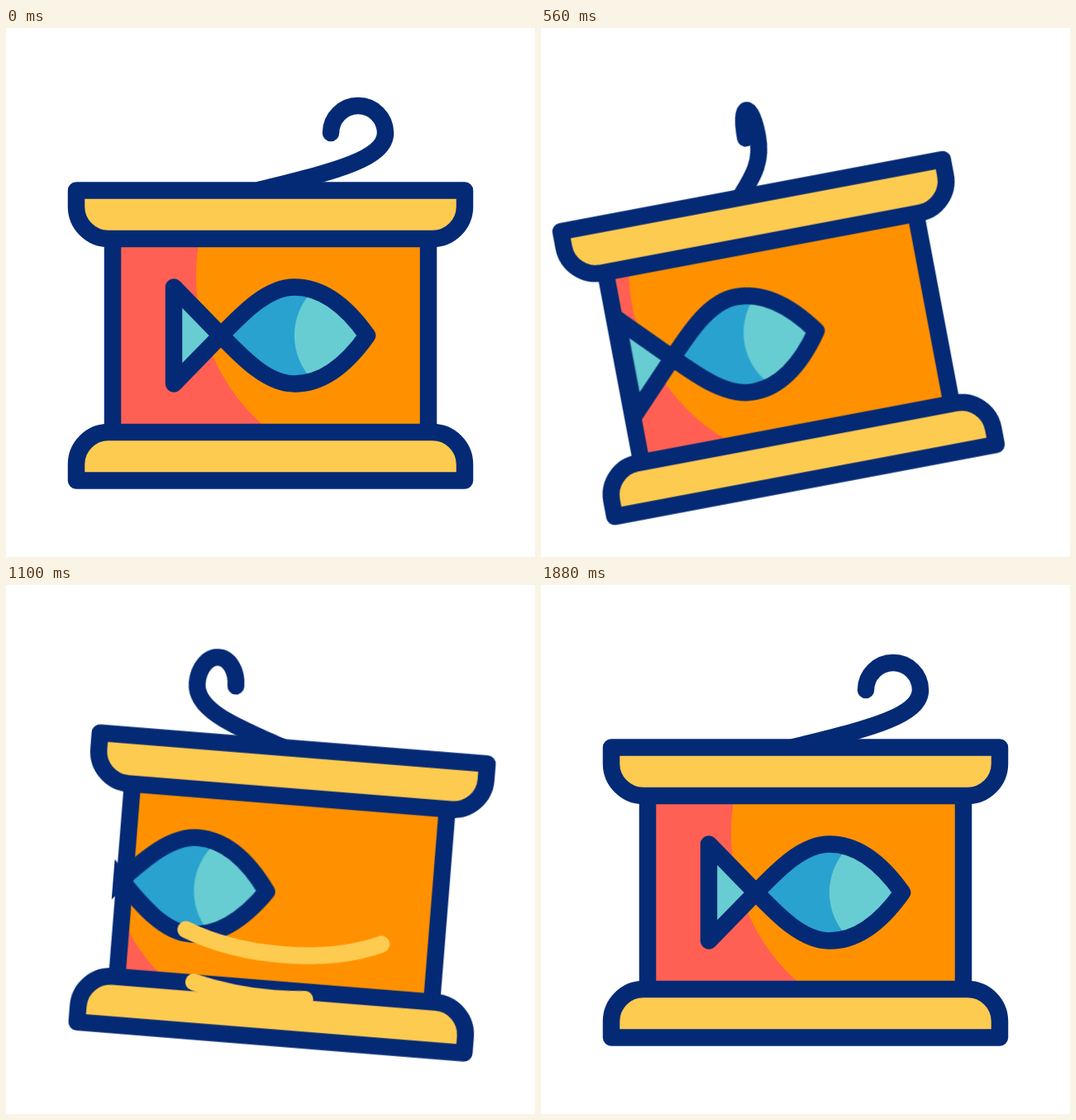
Write an HTML page without scripts that moves like this. It is 640 px wide and 640 px high and loops after 2400 ms.

```html
<!DOCTYPE html>
<html lang="en">
<head>
<meta charset="utf-8">
<title>Spinning fish can</title>
<style>
  html, body { margin: 0; width: 100%; height: 100%; overflow: hidden; background: #fff; }
  svg { display: block; width: 100%; height: 100%; }

  .line { stroke: #042a75; stroke-width: 20.5; stroke-linecap: round; stroke-linejoin: round; fill: none; }
  .gold { fill: #fecb51; }
  .red { fill: #ff6053; }
  .orange { fill: #ff9100; }
  .blue { fill: #29a2cf; }
  .aqua { fill: #68cdd2; }
  .swoosh { fill: none; stroke: #fecb51; stroke-width: 20.5; stroke-linecap: round; visibility: hidden; }

  .can, .hook, .fish, .paint { animation: 2400ms cubic-bezier(.333, 0, .667, 1) infinite; }
  .can { transform-origin: 320px 547.5px; animation-name: rock; }
  .hook { animation-name: turn; }
  .fish { animation-name: swim; }
  .paint { animation-name: slide; }
  .swoosh { animation: 2400ms linear infinite; }
  .high { animation-name: high; }
  .low { animation-name: low; }

  @keyframes rock {
    0% { transform: rotate(0deg); }
    23.75% { transform: rotate(-10.7deg); }
    40.83% { transform: rotate(8deg); }
    55.2% { transform: rotate(-4.05deg); }
    66.88% { transform: rotate(2.08deg); }
    78.33%, 100% { transform: rotate(0deg); }
  }

  /* the hook turns about the can's axis, keeping its line weight */
  @keyframes turn {
    0%, 34.17%, 67.5%, 100% {
      d: path("M0 196C84 175 153 160 153 127C153 108.8 138.2 94 120 94C101.8 94 87 108.8 87 127");
    }
    20.42% {
      d: path("M0 196C10.1 175 18.4 160 18.4 127C18.4 108.8 16.6 94 14.4 94C12.2 94 10.4 108.8 10.4 127");
    }
    45% {
      d: path("M0 196C-60.5 175 -110.2 160 -110.2 127C-110.2 108.8 -99.5 94 -86.4 94C-73.3 94 -62.6 108.8 -62.6 127");
      animation-timing-function: cubic-bezier(.3, 0, .4, 1);
    }
  }

  /* wind up, then one full turn of the label */
  @keyframes swim {
    0% { transform: translateX(0); }
    22.29% { transform: translateX(-73px); animation-timing-function: cubic-bezier(.23, 0, .34, 1); }
    66.67%, 100% { transform: translateX(540px); }
  }
  @keyframes slide {
    0% { transform: translateX(0); }
    22.71% { transform: translateX(-77px); animation-timing-function: cubic-bezier(.55, 0, .05, 1); }
    66.67%, 100% { transform: translateX(800px); }
  }

  @keyframes high {
    0%, 34.57% { visibility: hidden; stroke-dasharray: 0 300; stroke-dashoffset: 0; }
    34.58% { visibility: visible; stroke-dasharray: 0 300; stroke-dashoffset: 0; }
    36.67% { stroke-dasharray: 19 300; stroke-dashoffset: 0; }
    41.67% { stroke-dasharray: 58 300; stroke-dashoffset: 0; }
    50% { stroke-dasharray: 52 300; stroke-dashoffset: -48; }
    55% { stroke-dasharray: 19 300; stroke-dashoffset: -81; }
    58.33% { visibility: visible; stroke-dasharray: 0 300; stroke-dashoffset: -100; }
    58.34%, 100% { visibility: hidden; stroke-dasharray: 0 300; stroke-dashoffset: -100; }
  }
  @keyframes low {
    0%, 39.16% { visibility: hidden; stroke-dasharray: 0 300; stroke-dashoffset: 0; }
    39.17% { visibility: visible; stroke-dasharray: 0 300; stroke-dashoffset: 0; }
    44.17% { stroke-dasharray: 50 300; stroke-dashoffset: 0; }
    50% { stroke-dasharray: 60 300; stroke-dashoffset: -40; }
    55% { stroke-dasharray: 27 300; stroke-dashoffset: -73; }
    58.33% { visibility: visible; stroke-dasharray: 0 300; stroke-dashoffset: -100; }
    58.34%, 100% { visibility: hidden; stroke-dasharray: 0 300; stroke-dashoffset: -100; }
  }
</style>
</head>
<body>
<svg viewBox="0 0 640 640" role="img" aria-label="Fish can">
  <defs>
    <clipPath id="label"><rect x="129" y="255" width="382" height="234"/></clipPath>
    <clipPath id="print"><rect x="115" y="255" width="406" height="234"/></clipPath>
    <path id="rim" class="line" d="M85 196.5H555V216A39 39 0 0 1 516 255H124A39 39 0 0 1 85 216Z"/>
    <g id="fish">
      <path class="aqua" d="M203 313.5L260 372L203 430.5Z"/>
      <path class="aqua" d="M260 372C288 343 317 313.5 349 313.5C383 313.5 413 338 437 372C413 406 383 430.5 349 430.5C317 430.5 288 401 260 372Z"/>
      <path class="blue" d="M260 372C288 343 317 313.5 349 313.5L370 319A77 77 0 0 0 370 425L349 430.5C317 430.5 288 401 260 372Z"/>
      <path class="line" d="M203 313.5L260 372C288 401 317 430.5 349 430.5C383 430.5 413 406 437 372C413 338 383 313.5 349 313.5C317 313.5 288 343 260 372L203 430.5Z"/>
    </g>
  </defs>

  <g class="can">
    <g transform="translate(306 0)">
      <path class="line hook" d="M0 196C84 175 153 160 153 127C153 108.8 138.2 94 120 94C101.8 94 87 108.8 87 127"/>
    </g>

    <g clip-path="url(#label)">
      <rect class="red" x="129" y="255" width="382" height="234"/>
      <g class="paint orange">
        <circle cx="472" cy="300" r="242"/>
        <circle cx="-328" cy="300" r="242"/>
      </g>
    </g>
    <g clip-path="url(#print)">
      <g class="fish">
        <use href="#fish"/>
        <use href="#fish" x="-540"/>
      </g>
    </g>

    <path class="line" d="M129 255V489M511 255V489"/>
    <path class="gold" d="M85 196.5H555V216A39 39 0 0 1 516 255H124A39 39 0 0 1 85 216Z"/>
    <path class="gold" d="M85 547.5H555V528A39 39 0 0 0 516 489H124A39 39 0 0 0 85 528Z"/>
    <use href="#rim"/>
    <use href="#rim" transform="matrix(1 0 0 -1 0 744)"/>

    <path class="swoosh high" pathLength="100" d="M129 358C170 470 470 480 508 362"/>
    <path class="swoosh low" pathLength="100" d="M193 480Q320 520 447 480"/>
  </g>
</svg>
</body>
</html>
```
